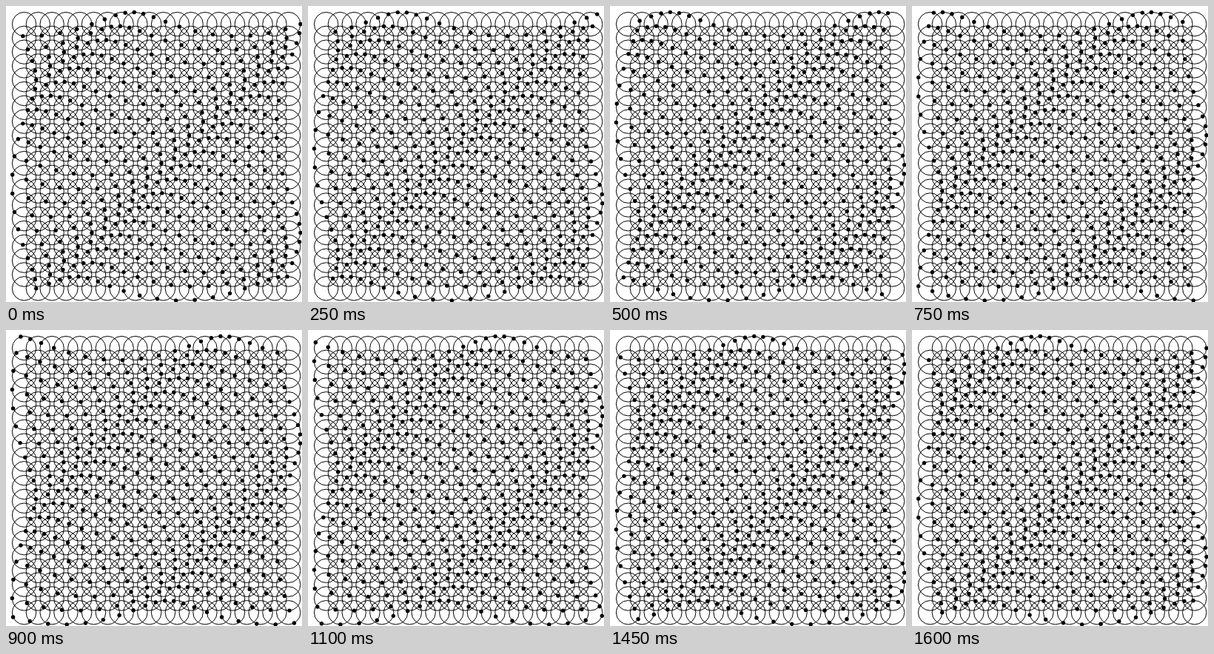
An HTML page with a canvas that plays this animation: 400x400 px, repeating every 1.65 s.

```html
<!DOCTYPE html>
<html lang="en">
<head>
<meta charset="utf-8">
<title>Circle grid wave</title>
<style>
  html, body { margin: 0; width: 100%; height: 100%; overflow: hidden; background: #fff; }
  canvas { display: block; width: 400px; height: 400px; }
</style>
</head>
<body>
<canvas id="stage" width="400" height="400"></canvas>
<script>
  const ctx = document.getElementById('stage').getContext('2d');
  const TAU = Math.PI * 2;
  const COUNT = 20, START = 24.55, GAP = 18.8;
  const RING = 16.2, DOT = 2.7;
  const STEP_MS = 50, STEPS = 33, TURN = 32;
  const LAG = TAU / 15;

  function eachCell(visit) {
    for (let row = 0; row < COUNT; row++) {
      for (let col = 0; col < COUNT; col++) {
        visit(START + GAP * col, START + GAP * row, row + col);
      }
    }
  }

  function disc(x, y, r) {
    ctx.moveTo(x + r, y);
    ctx.arc(x, y, r, 0, TAU);
  }

  function draw(step) {
    ctx.fillStyle = '#fff';
    ctx.fillRect(0, 0, 400, 400);

    ctx.strokeStyle = ctx.fillStyle = '#000';
    ctx.lineWidth = 1;
    eachCell((x, y) => {
      ctx.beginPath();
      disc(x, y, RING);
      ctx.stroke();
    });

    ctx.beginPath();
    eachCell((x, y, diagonal) => {
      const a = (4 - diagonal) * LAG - step * TAU / TURN;
      disc(x + RING * Math.cos(a), y + RING * Math.sin(a), DOT);
    });
    ctx.fill();
  }

  // The last step closes the turn, so the starting pose holds twice per loop.
  const begin = performance.now();
  let shown = -1;
  function tick() {
    const step = Math.floor((performance.now() - begin) / STEP_MS) % STEPS;
    if (step !== shown) draw(shown = step);
    requestAnimationFrame(tick);
  }
  tick();
</script>
</body>
</html>
```
